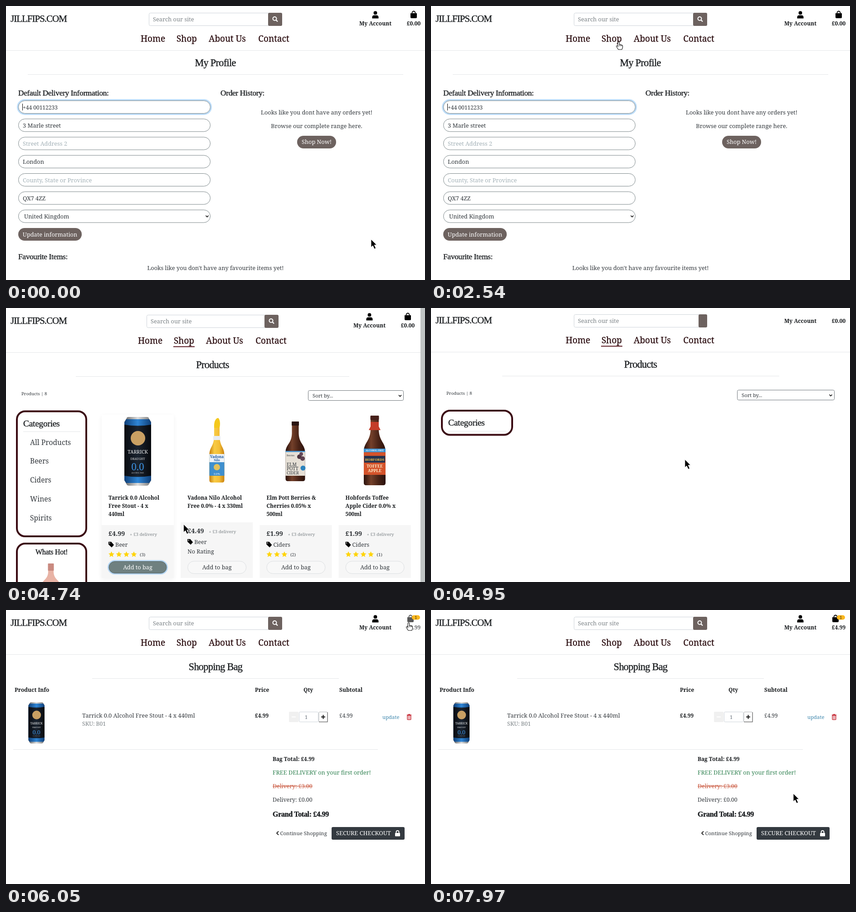
Animation, 924 px wide and 606 px high, one loop 8 s. Source, as an HTML page:

```html
<!DOCTYPE html>
<html lang="en">
<head>
<meta charset="utf-8">
<title>Shop walkthrough</title>
<style>
html, body { margin: 0; width: 100%; height: 100%; overflow: hidden; background: #fff; }
svg { display: block; width: 924px; height: 606px; }
text { font-family: "Noto Serif", serif; fill: #33383d; white-space: pre; }
.b { font-weight: 600; fill: #16191c; }
.n { font-weight: 500; fill: #2b0d10; stroke: #2b0d10; stroke-width: .3px; }
.h { font-family: "Liberation Serif", serif; fill: #1b1e21; stroke: #1b1e21; stroke-width: .4px; letter-spacing: -.3px; }
.big { letter-spacing: -.7px; }
.m { text-anchor: middle; }
</style>
</head>
<body>
<svg id="stage" viewBox="0 0 924 606" xmlns="http://www.w3.org/2000/svg"></svg>
<script>
const MAROON = '#3a0a12', TAUPE = '#6d625f', GRAY = '#7b8286';
const stage = document.getElementById('stage');

// Drawing helpers
const text = (x, y, s, size = 12.75, cls = '', fill = '', more = '') =>
  `<text x="${x}" y="${y}" font-size="${size}" class="${cls}" ${fill ? `style="fill:${fill}"` : ''} ${more}>${s}</text>`;
const box = (x, y, w, h, fill, r = 0, line = 'none', lw = 1) =>
  `<rect x="${x}" y="${y}" width="${w}" height="${h}" rx="${r}" fill="${fill}" stroke="${line}" stroke-width="${lw}"/>`;
const path = (d, fill = 'none', line = 'none', lw = 1, more = '') =>
  `<path d="${d}" fill="${fill}" stroke="${line}" stroke-width="${lw}" ${more}/>`;
const disc = (x, y, r, fill) => `<circle cx="${x}" cy="${y}" r="${r}" fill="${fill}"/>`;
const group = (id, s, more = '') => `<g id="${id}" ${more}>${s}</g>`;
const at = (x, y, s, k = 1) => `<g transform="translate(${x} ${y}) scale(${k})">${s}</g>`;
const rule = (x1, x2, y) => path(`M${x1} ${y}H${x2}`, 'none', '#e4e6e8');
const title = (x, y, s) => text(x, y, s, 22.3, 'h big m');

// Icons
const userIcon = disc(0, -4.3, 3.9, '#000') + path('M-7 8V5.5Q-7 1-2.5 1H2.5Q7 1 7 5.5V8Z', '#000');
const bagIcon = path('M-7 -3H7V6Q7 8 5 8H-5Q-7 8-7 6Z', '#000') +
  path('M-3.5 -1V-4A3.5 3.5 0 0 1 3.5 -4V-1', 'none', '#000', 1.8);
const lensIcon = `<circle cx="-1" cy="-1" r="4" fill="none" stroke="#fff" stroke-width="2"/>` +
  path('M2 2L5.5 5.5', 'none', '#fff', 2.4);
const tagIcon = path('M-6 -6H0L6 1L1 6.5L-6 0Z', '#000') + disc(-3.4, -3.4, 1.1, '#f6f6f6');
const lockIcon = box(-5.5, -1, 11, 7.5, '#fff', 1.2) + path('M-3 0V-3A3 3 0 0 1 3 -3V0', 'none', '#fff', 1.8);
const trashIcon = path('M-5 -4.5H5M-2 -5.8H2', 'none', '#c8323c', 1.5) +
  path('M-4 -3H4V5Q4 6 3 6H-3Q-4 6-4 5Z', 'none', '#c8323c', 1.4) +
  path('M-1.5 -2V5M1.5 -2V5', 'none', '#c8323c', 1.1);
const starPath = 'M' + Array.from({ length: 10 }, (_, i) => {
  const r = i % 2 ? 3.2 : 6.8, a = i * Math.PI / 5;
  return (r * Math.sin(a)).toFixed(2) + ' ' + (-r * Math.cos(a)).toFixed(2);
}).join('L') + 'Z';
const caretDown = (x, y) => path(`M${x - 3} ${y - 1.5}L${x} ${y + 1.5}L${x + 3} ${y - 1.5}`, 'none', '#111', 1.7);

// Products
const can = path('M5 3Q5 0 10 0H49Q54 0 54 3L59 11V140L54 149Q53 152 48 152H11Q6 152 5 149L0 140V11Z', 'url(#steel)') +
  path('M0 12L4 5H55L59 12V140L55 146H4L0 140Z', 'url(#blue)') +
  path('M0 17Q29.5 22 59 17V130Q29.5 135 0 130Z', 'url(#dark)') + disc(30, 47, 16, '#c9a063') +
  text(29.5, 81, 'TARRICK', 10.5, 'm', '#f1f1f1') + text(29.5, 95, 'DRAUGHT', 6.5, 'm', '#ddd') +
  text(29.5, 118, '0.0', 21, 'm', '#3b8fdd') + text(29.5, 125, 'ALCOHOL FREE', 3.6, 'm', '#ccc');

// Bottle with a slim neck that swells smoothly into the body
function bottle(cx, top, end, half, neck, fill) {
  const h = end - top, s = top + h * .2, b = top + h * .52, m = top + h * .38;
  const d = `M${cx - neck} ${top}H${cx + neck}V${s}C${cx + neck + 1} ${m} ${cx + half} ${m} ${cx + half} ${b}` +
    `V${end - 5}Q${cx + half} ${end} ${cx + half - 5} ${end}H${cx - half + 5}Q${cx - half} ${end} ${cx - half} ${end - 5}` +
    `V${b}C${cx - half} ${m} ${cx - neck - 1} ${m} ${cx - neck} ${s}Z`;
  return path(d, fill);
}
const bottles = at(261, 241, can) +
  bottle(465, 259, 386, 16.5, 6, 'url(#amber)') +
  path('M459 265Q458 245 468 243Q474 250 471 265Z', '#f4c81c') +
  box(457, 283, 16, 9, '#e8edf3', 2) + box(448.5, 323, 33, 48, '#3f8fce') +
  box(448.5, 323, 33, 18, '#eef3f8') + text(465, 332, 'Vadona', 8, 'b m', '#1f5aa0') +
  text(465, 339, 'Nilo', 6.5, 'b m', '#1f5aa0') + disc(465, 352, 7, '#e3c15c') +
  text(465, 369, '0.0%', 6, 'm', '#fff') +
  bottle(638, 251, 383, 21.5, 7.5, 'url(#brown)') + box(630, 251, 16, 9, '#2a1512', 1) +
  box(616.5, 316, 43, 55, '#e6e0d6') + box(616.5, 316, 43, 2.5, '#3f8fce') +
  disc(647, 329, 5, '#4d3540') + disc(654, 333, 5, '#5e4050') + disc(651, 323, 4, '#65485a') +
  text(619, 328, 'Berries', 5) + text(619, 350, 'ELM', 10) + text(619, 359, 'POTT', 10) +
  text(619, 368, 'CIDER', 9) + disc(655, 354, 5.5, '#2d83bd') +
  bottle(813, 238, 392, 24, 9, 'url(#brown)') + box(803.5, 238, 19, 10, '#47201a', 2) +
  path('M804 252H822V262L826 270H800L804 262Z', '#c43d28') +
  box(789, 311, 48, 58, '#d4532b') + box(789, 311, 48, 8, '#3c91cf') +
  text(813, 317, 'ALCOHOL FREE', 5, 'b m', '#fff') + box(790, 327, 46, 15, '#26334f') +
  text(813, 338, 'HOBFORDS', 7.4, 'b m', '#f5c34b') +
  text(813, 353, 'TOFFEE', 9, 'b m', '#fff1cd') + text(813, 363, 'APPLE', 9, 'b m', '#fff1cd');

// Page header; kind: 0 full width, 1 with scrollbar, 2 still loading
function header(kind, shop, price) {
  const bare = kind === 2, n = kind === 1, dy = bare ? -1 : 0, dx = n ? -6 : 0, rx = n ? -13 : 0;
  const left = n ? 310 : 315, right = n ? 601 : 609, btn = n ? 570 : bare ? 590 : 578;
  const nav = [['Home', 324], ['Shop', 398.5], ['About Us', 488], ['Contact', 590.5]]
    .map(([s, x]) => text(x + dx, 79 + dy, s, 19, 'n m')).join('');
  const ty = bare ? 33 : 43;
  const badge = price === '£0.00' ? '' : box(895 + rx, 11.5, 18, 10, '#fdb81e', 5) + text(904 + rx, 20, '1', 8.5, 'm', '#222');
  return box(0, 0, 924, 606, '#fff') +
    text(10, 34.5 + dy, 'JILLFIPS.COM', 21, 'h', '', 'style="letter-spacing:-1px"') +
    box(left + .5, 15.5 + dy, right - left - 1, 28, '#fff', 3, '#ced4da') +
    box(btn, 15 + dy, right - btn, 29, TAUPE, 3) +
    (bare ? '' : at((btn + right) / 2, 29, lensIcon)) +
    text(left + 9, 34 + dy, 'Search our site', 12.75, '', GRAY) + nav +
    (shop ? path(`M${375 + dx} ${85.5 + dy}h47`, 'none', '#5b1a22', 2) : '') +
    text(814.5 + rx, ty, 'My Account', 12, 'b m') +
    (bare ? '' : at(814.5 + rx, 19.5, userIcon)) +
    `<g class="bag">${bare ? '' : at(892 + rx + (badge ? 0 : 7), 19, bagIcon)}${text(899 + rx, ty, price, 12, 'b m')}</g>` +
    badge + rule(0, n ? 914 : 924, 98.5 + dy);
}

// Profile page
const fields = [['+44 00112233', 1], ['3 Marle street', 1], ['Street Address 2', 0], ['London', 1],
  ['County, State or Province', 0], ['QX7 4ZZ', 1], ['United Kingdom', 1]];
const form = fields.map(([s, filled], i) => {
  const y = 209.5 + i * 40.25;
  return box(27.5, y, 423, 28, '#fff', 14, '#7c878a') +
    text(i === 6 ? 40 : 37, y + 19, s, i ? 12.75 : 12, '', filled ? '#30363b' : '#a3b1b7');
}).join('');
const profile = header(0, false, '£0.00') + title(461.5, 133, 'My Profile') + rule(48, 876, 151.5) +
  text(27, 198, 'Default Delivery Information:', 17.3, 'h') + text(473, 198, 'Order History:', 17.3, 'h') +
  group('focus', box(26, 208, 426, 31, 'none', 15.5, '#bcdcf8', 4)) + form + caretDown(443.5, 465) +
  group('caret', path('M36.5 216V231', 'none', '#000')) +
  box(27, 491, 140, 28, TAUPE, 14) + text(97, 509.5, 'Update information', 12.75, 'm', '#fff') +
  text(685, 240, 'Looks like you dont have any orders yet!', 12.75, 'm') +
  text(685, 270, 'Browse our complete range here.', 12.75, 'm') +
  box(642, 287, 86, 28, TAUPE, 14) + text(685, 305, 'Shop Now!', 12.75, 'm', '#fff') +
  text(27, 560, 'Favourite Items:', 17.3, 'h') +
  text(462, 584, "Looks like you don't have any favourite items yet!", 12.75, 'm');

// Product list
const bare = header(2, true, '£0.00') + title(462, 132, 'Products') + rule(157, 768, 150.5) +
  text(34, 192, 'Products | 8', 9.7) + box(675.5, 181.5, 214, 22, '#fff', 3, '#6f767b') +
  text(685, 196.5, 'Sort by...', 11.3) + caretDown(881.5, 193) +
  box(24, 227, 155, 53.5, '#fff', 18, MAROON, 4) + text(38, 260, 'Categories', 19.5, 'h') + rule(38, 166, 272.5);

const items = [
  [['Tarrick 0.0 Alcohol', 'Free Stout - 4 x', '440ml'], '£4.99', 'Beer', 4, 3],
  [['Vadona Nilo Alcohol', 'Free 0.0% - 4 x 330ml'], '£4.49', 'Beer', 0, 0],
  [['Elm Pott Berries &amp;', 'Cherries 0.05% x', '500ml'], '£1.99', 'Ciders', 3, 2],
  [['Hobfords Toffee', 'Apple Cider 0.0% x', '500ml'], '£1.99', 'Ciders', 4, 1]
];
const cards = items.map(([lines, price, kind, stars, votes], i) => {
  const x = 211 + i * 174.2, tx = x + 15, up = stars ? 0 : -6;
  let s = box(x, 480 + up, 159, 117 - up, '#f6f6f6');
  lines.forEach((l, j) => s += text(tx, 423.5 + j * 18, l, 11.7, 'b'));
  s += text(tx, 504 + up, price, 14.4, 'b', '#2b2f33') + text(tx + 47, 504 + up, '+ £3 delivery', 9.8, '', GRAY) +
    at(tx + 6, 523 + up, tagIcon) + text(tx + 15, 528 + up, kind, 12.5);
  for (let j = 0; j < stars; j++) s += at(tx + 6.5 + j * 16.5, 545, path(starPath, '#ffd40a'));
  s += stars ? text(tx + stars * 16.5 + 3, 549, `(${votes})`, 9.8) : text(tx, 543, 'No Rating', 12.5);
  return s + box(tx + .5, 560, 129, 27.5, '#f8f8f8', 13.75, '#dcdfe1') + text(tx + 65, 578, 'Add to bag', 12.75, 'm');
}).join('');
const links = ['All Products', 'Beers', 'Ciders', 'Wines', 'Spirits']
  .map((s, i) => text(53, 302.5 + i * 41.8, s, 15.6)).join('');
const list = price => header(1, true, price) + box(914, 0, 10, 606, '#bfc3c3') +
  title(455.5, 133, 'Products') + rule(154, 757, 151.5) + text(34, 192.5, 'Products | 8', 9.7) +
  box(666.5, 182.5, 210, 22, '#fff', 3, '#6f767b') + text(676, 198, 'Sort by...', 11.3) + caretDown(869, 194) +
  box(24, 228.5, 153, 276.5, '#fff', 18, MAROON, 4) + text(38, 262, 'Categories', 19.5, 'h') + rule(38, 164, 273.5) + links +
  box(24, 521, 153, 140, '#fff', 18, MAROON, 4) + text(100.5, 545, 'Whats Hot!', 16, 'h m') +
  bottle(99, 566, 660, 21, 6, '#e8b3a5') + box(92.5, 565, 13, 16, '#c98a80', 1) +
  (price === '£0.00' ? group('hover', box(211, 236, 159, 361, '#fff', 0), 'filter="url(#soft)"') : '') +
  bottles + cards;

const pressed = group('pressed', box(226, 559.5, 129, 28, '#6f8080', 14, '#b5d6f3', 4) +
  box(227, 560.5, 127, 26, '#6f8080', 13, '#566') + text(290.5, 578, 'Add to bag', 12.75, 'm', '#fff'));

const toast = group('toast', `<g filter="url(#soft)">${box(631, 64, 260, 92, '#fff', 14)}</g>` +
  path('M631 91V78Q631 64 645 64H877Q891 64 891 78V91Z', '#6f7e7f') +
  text(640, 81.5, 'Success!', 11, 'b', '#fff') + path('M873.5 73L880 79.5M880 73L873.5 79.5', 'none', '#d5dada', 2.4) +
  text(640, 112, 'Added Tarrick 0.0 Alcohol Free Stout - 4 x', 11.3, '', '#6a7074') +
  text(640, 128, '440ml to your bag', 11.3, '', '#6a7074') + path('M891 141V156H876Z', '#28a745'));

// Shopping bag
const heads = [[19, 'Product Info'], [549, 'Price'], [656, 'Qty'], [735, 'Subtotal']]
  .map(([x, s]) => text(x, 180.5, s, 12, 'b')).join('');
const basket = header(0, false, '£4.99') + title(462, 133, 'Shopping Bag') + rule(190, 734, 151.5) + heads +
  at(49.5, 204, can, .6) + text(168, 238, 'Tarrick 0.0 Alcohol Free Stout - 4 x 440ml', 12.75) +
  text(168, 256, 'SKU: B01', 12.2, '', GRAY) + text(549, 238, '£4.99', 11.9, 'b') + text(735, 238, '£4.99', 11.9) +
  box(624, 225, 21, 23, '#f0f0f0', 2) + path('M630 236.5h9', 'none', '#fff', 2) +
  box(646.5, 225.5, 42, 22, '#fff', 2, '#ced4da') + text(662, 241, '1', 11, 'm', '#66707a') +
  box(690, 225.5, 19, 22, '#fff', 2, '#b3b6b8') + path('M690 247.5H709V226', 'none', '#777', 1.3) +
  path('M695 236.5h9M699.5 232v9', 'none', '#111', 2) +
  text(830, 241, 'update', 11.3, '', '#3f87ad') + at(889, 236.5, trashIcon) + rule(16, 820, 308.5) +
  text(588, 334, 'Bag Total: £4.99', 11.9, 'b') +
  text(588, 364, 'FREE DELIVERY on your first order!', 12.7, '', '#2f8150') +
  text(588, 394, 'Delivery: £3.00', 12.4, '', '#c9573e', 'text-decoration="line-through"') +
  text(588, 424, 'Delivery: £0.00', 12.4) + text(588, 457, 'Grand Total: £4.99', 16, 'h', '', 'font-weight="700"') +
  path('M601 489.5L597 493.5L601 497.5', 'none', '#222', 1.8) + text(604.5, 497.5, 'Continue Shopping', 11.4) +
  box(718, 480, 161, 28, '#343a40', 3) + text(728, 498, 'SECURE CHECKOUT', 12.8, '', '#fff') + at(863.5, 494, lockIcon);

const arrow = path('M0 0V17.5L4 14L7.3 21.3L10.6 19.8L7.3 12.6H12.5Z', '#000', '#fff', .9);
const hand = path('M-1.8 1.2Q0-.8 1.6 1.2V6.5Q3.2 5.3 4 7Q6 6 6.5 7.8Q8.6 7.2 8.6 9.5V13L7 17.2H-1L-4.8 11.2' +
  'Q-6 9.2-4.2 8.8Q-3 8.6-1.8 10.5Z', '#fff', '#111', 1.1) + path('M1.6 6.5V10M4.1 7.2V10M6.5 8V10', 'none', '#111', .8);

const ramp = (id, ...c) => `<linearGradient id="${id}">` +
  c.map((v, i) => `<stop offset="${i / (c.length - 1)}" stop-color="${v}"/>`).join('') + '</linearGradient>';
stage.innerHTML = '<defs>' + ramp('steel', '#666', '#ddd', '#777') + ramp('dark', '#080b11', '#1b2430', '#07090d') +
  ramp('blue', '#0f3f78', '#2f86d6', '#0f3f78') +
  ramp('amber', '#c98110', '#f8cb45', '#f3bd36', '#c98110') + ramp('brown', '#2a120d', '#74402a', '#4a2417', '#2a110c') +
  '<filter id="soft" x="-20%" y="-20%" width="140%" height="150%"><feDropShadow dx="0" dy="3" stdDeviation="6" flood-opacity=".12"/></filter></defs>' +
  group('profile', profile) + group('bare', bare) + group('list', list('£0.00') + pressed) +
  group('added', list('£4.99') + toast) + group('basket', basket) +
  group('cursor', group('arrow', arrow) + group('hand', hand) + group('click', disc(0, 2, 11, '#ffee2e'), 'opacity=".6"'));

// Pointer route: time, x, y
const route = [
  [0, 805, 516], [130, 805, 516], [330, 828, 400], [560, 790, 230], [760, 690, 153], [920, 610, 185], [1100, 670, 250],
  [1300, 790, 185], [1460, 843, 290], [1600, 790, 395], [1720, 708, 417], [1790, 714, 418], [2060, 714, 418],
  [2260, 600, 290], [2460, 428, 98], [2540, 414, 79], [2890, 414, 79], [3430, 393, 108], [3770, 393, 108],
  [3950, 380, 250], [4200, 330, 470], [4420, 290, 572], [4560, 290, 572], [4740, 391, 479], [5000, 600, 300],
  [5340, 872, 50], [5480, 888, 28], [6050, 888, 28], [6200, 800, 140], [6400, 610, 270], [6550, 552, 350],
  [6700, 640, 402], [6870, 766, 403], [7010, 818, 394], [7150, 800, 330], [7280, 690, 310], [7430, 566, 370],
  [7560, 600, 416], [7630, 679, 417], [7770, 794, 413], [7970, 799, 406], [8000, 799, 406]
];
function slope(i, k) {
  const a = route[i - 1], b = route[i], c = route[i + 1];
  if (!a || !c || a[k] === b[k] || b[k] === c[k]) return 0;
  return (c[k] - a[k]) / (c[0] - a[0]);
}
function pointer(t) {
  let i = 0;
  while (i < route.length - 2 && t >= route[i + 1][0]) i++;
  const a = route[i], b = route[i + 1], d = b[0] - a[0], u = (t - a[0]) / d, u2 = u * u, u3 = u2 * u;
  return [1, 2].map(k => a[k] * (2 * u3 - 3 * u2 + 1) + b[k] * (3 * u2 - 2 * u3) +
    d * (slope(i, k) * (u3 - 2 * u2 + u) + slope(i + 1, k) * (u3 - u2)));
}

// Visible spans of each layer
const spans = {
  profile: [[0, 3360]], bare: [[3360, 3570], [4900, 5040]], list: [[3570, 4900]], added: [[5040, 5600]], basket: [[5600, 8000]],
  focus: [[0, 2750]], caret: [[0, 500], [1030, 1560], [2090, 2620]], pressed: [[4480, 4900]],
  hand: [[2440, 2900], [4340, 4620], [5400, 6100]], click: [[5460, 5580]]
};
const el = {};
[...Object.keys(spans), 'arrow', 'cursor', 'hover', 'toast'].forEach(id => el[id] = document.getElementById(id));
const bags = stage.querySelectorAll('.bag');
const clamp = v => Math.max(0, Math.min(1, v));

function draw(now) {
  const t = now % 8000;
  const on = id => spans[id].some(([a, b]) => t >= a && t < b);
  for (const id in spans) el[id].style.display = on(id) ? '' : 'none';
  el.arrow.style.display = on('hand') ? 'none' : '';
  const [x, y] = pointer(t);
  el.cursor.setAttribute('transform', `translate(${x.toFixed(1)} ${y.toFixed(1)})`);
  el.hover.style.opacity = Math.min(clamp((t - 4080) / 200), clamp((4860 - t) / 260));
  el.toast.style.opacity = clamp((t - 5040) / 150);
  const dim = t > 5400 && t < 6100 ? .65 : 1;
  bags.forEach(b => b.style.opacity = dim);
  requestAnimationFrame(draw);
}
draw(performance.now());
</script>
</body>
</html>
```
